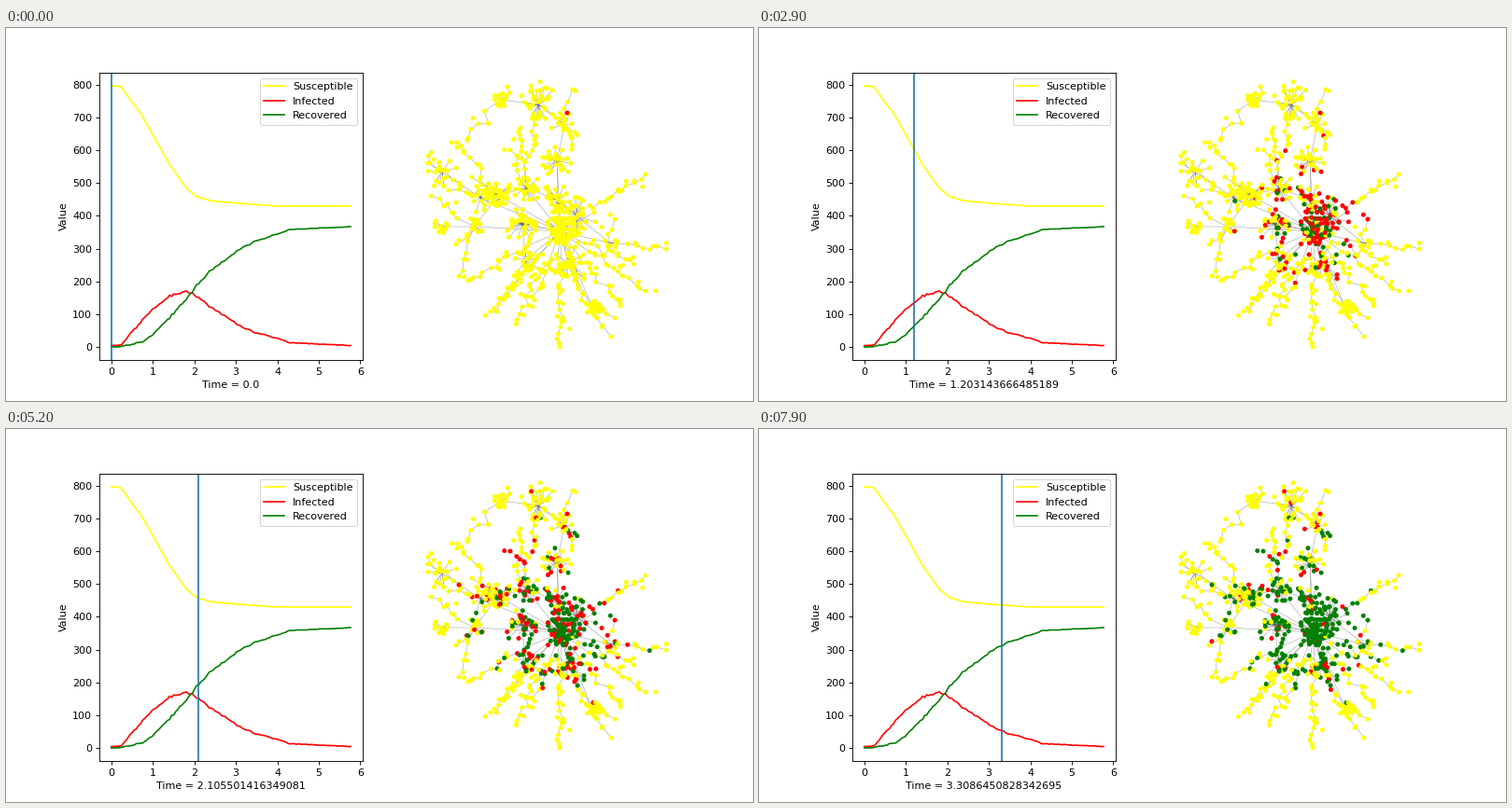
A matplotlib script that plays this animation: 800 px wide and 400 px high, repeating every 8000 ms.

```python
import numpy as np
import matplotlib.pyplot as plt
from matplotlib.animation import FuncAnimation
from matplotlib.collections import LineCollection

FRAMES, INTERVAL = 80, 100
STEP = 0.10026197220709908   # simulated time per update
HOLD = 2.4                   # frames per update
T_END, TOTAL = 5.765, 801
rng = np.random.default_rng(12)

# ---- epidemic curves ----
t = np.linspace(0, T_END, 116)
S = np.interp(t, [0, .23, .5, .7, 1, 1.4, 1.8, 2.05, 2.4, 3.1, 4, T_END],
              [797, 795, 746, 714, 648, 557, 486, 459, 446, 438, 430, 430])
I = np.interp(t, [0, .23, .5, 1, 1.4, 1.8, 2.1, 2.5, 3, 3.5, 4, 4.3, 5, T_END],
              [4, 5, 47, 115, 156, 171, 150, 113, 70, 43, 26, 13, 9, 4])
I += rng.normal(0, .2, t.size) * np.sqrt(I)
R = np.maximum.accumulate(np.maximum(TOTAL - S - I, 0))

# ---- contact network, in stage pixels ----
# x, y, leaves, radius
HUBS = np.array([
    (594, 218, 75, 8), (611, 202, 42, 12), (591, 184, 36, 8), (602, 252, 34, 10),
    (557, 172, 26, 7), (552, 210, 40, 9), (557, 248, 18, 8), (527, 179, 46, 7),
    (508, 182, 16, 9), (502, 213, 16, 5), (466, 213, 14, 4), (467, 154, 18, 9),
    (590, 143, 28, 9), (598, 104, 20, 8), (570, 82, 24, 9), (530, 77, 18, 4),
    (648, 231, 10, 5), (628, 300, 26, 5)])
# hub index -> ends of the twigs that leave it
TWIGS = {
    0: [(593, 342), (547, 313), (519, 304), (495, 271), (528, 290), (566, 292),
        (616, 292), (658, 298), (685, 282), (672, 253), (685, 157)],
    4: [(551, 107), (540, 131), (565, 98)],
    7: [(474, 174), (499, 160), (483, 123)],
    9: [(485, 266), (455, 180), (482, 232)],
    11: [(452, 137), (486, 166)],
    14: [(562, 62), (577, 64)],
    13: [(607, 66), (606, 130)],
    15: [(495, 118), (537, 63)],
    16: [(707, 237), (652, 205)],
    17: [(648, 331), (652, 311)],
}
SPACING = 6.5
nodes, edges = [], []
centre = HUBS[0, :2]


def fan(x, y, leaves, radius):
    """Leaves scattered around a hub, each tied to it."""
    xy = (x, y) + np.clip(rng.normal(0, radius, (int(leaves), 2)),
                          -1.7 * radius, 1.7 * radius)
    nodes.extend(xy)
    edges.extend([(x, y), q] for q in xy)


def twig(start, end):
    """A wandering chain with side leaves; long ones begin with a bare tie."""
    length = np.hypot(*(end - start))
    u = np.linspace(.35 if length > 50 else .2, 1, max(3, int(length * .7 / SPACING)))
    path = start + u[:, None] * (end - start)
    path[:-1] += rng.normal(0, 2.2, path[:-1].shape)
    side = path + rng.normal(0, 4.5, path.shape)
    side = side[rng.random(len(path)) < .6]
    nodes.extend([*path, *side])
    edges.extend(zip([start, *path], path))


gap = np.hypot(*(HUBS[:, :2] - centre).T)
for i, hub in enumerate(HUBS):
    fan(*hub)
    if i:
        # tie each hub to its nearest neighbour on the way to the centre
        inner = HUBS[gap < gap[i], :2]
        edges.append([hub[:2], inner[np.hypot(*(inner - hub[:2]).T).argmin()]])
        if gap[i] < 110:
            edges.append([hub[:2], centre])
    for end in TWIGS.get(i, []):
        twig(hub[:2], np.array(end, float))

nodes = np.array(nodes)
count = len(nodes)
rank = (np.arange(count) + 1) * TOTAL / count


def spread_over(key, curve):
    """Give each node the time at which the curve reaches its rank."""
    times = np.empty(count)
    times[np.argsort(key)] = np.interp(rank, curve, t, right=99)
    return times


# the infection works outwards from the centre, faster upwards than down
dx, dy = (nodes - centre).T
reach = np.hypot(dx, dy * np.where(dy > 0, 1.5, .8))
caught = spread_over(reach + rng.normal(0, 30, count), S[0] - S)
healed = spread_over(caught + rng.exponential(.7, count), R)
healed = np.maximum(healed, caught + STEP)

# the first case stays ill throughout
nodes = np.vstack([nodes, (601, 91)])
caught, healed = np.append(caught, -1), np.append(healed, 99)
palette = np.array([(1, 1, 0), (1, 0, 0), (0, .5, 0)])

# ---- figure ----
fig = plt.figure(figsize=(10, 5), dpi=80, facecolor="white")
ax = fig.add_subplot(1, 2, 1)
for data, color, name in ((S, "yellow", "Susceptible"), (I, "red", "Infected"),
                          (R, "green", "Recovered")):
    ax.plot(t, data, color=color, label=name)
ax.set_xlim(-.05 * T_END, 1.05 * T_END)
ax.set_ylim(-39.85, 836.85)
ax.set_ylabel("Value")
ax.legend(loc="upper right")
bar = ax.axvline(0)
caption = ax.set_xlabel("Time = 0.0")

net = fig.add_axes([0, 0, 1, 1])
net.set_xlim(0, 800)
net.set_ylim(400, 0)
net.axis("off")
net.add_collection(LineCollection(edges, colors="0.4", linewidths=.3, zorder=1))
dots = net.scatter(*nodes.T, s=20, linewidths=0, zorder=2)


def update(frame):
    now = int((frame + .5) / HOLD) * STEP
    bar.set_xdata([now, now])
    caption.set_text(f"Time = {now}")
    state = (caught <= now).astype(int) + (healed <= now)
    dots.set_facecolor(palette[state])
    return bar, caption, dots


anim = FuncAnimation(fig, update, frames=FRAMES, interval=INTERVAL,
                     repeat=True, repeat_delay=0, blit=False)
plt.show()
```
